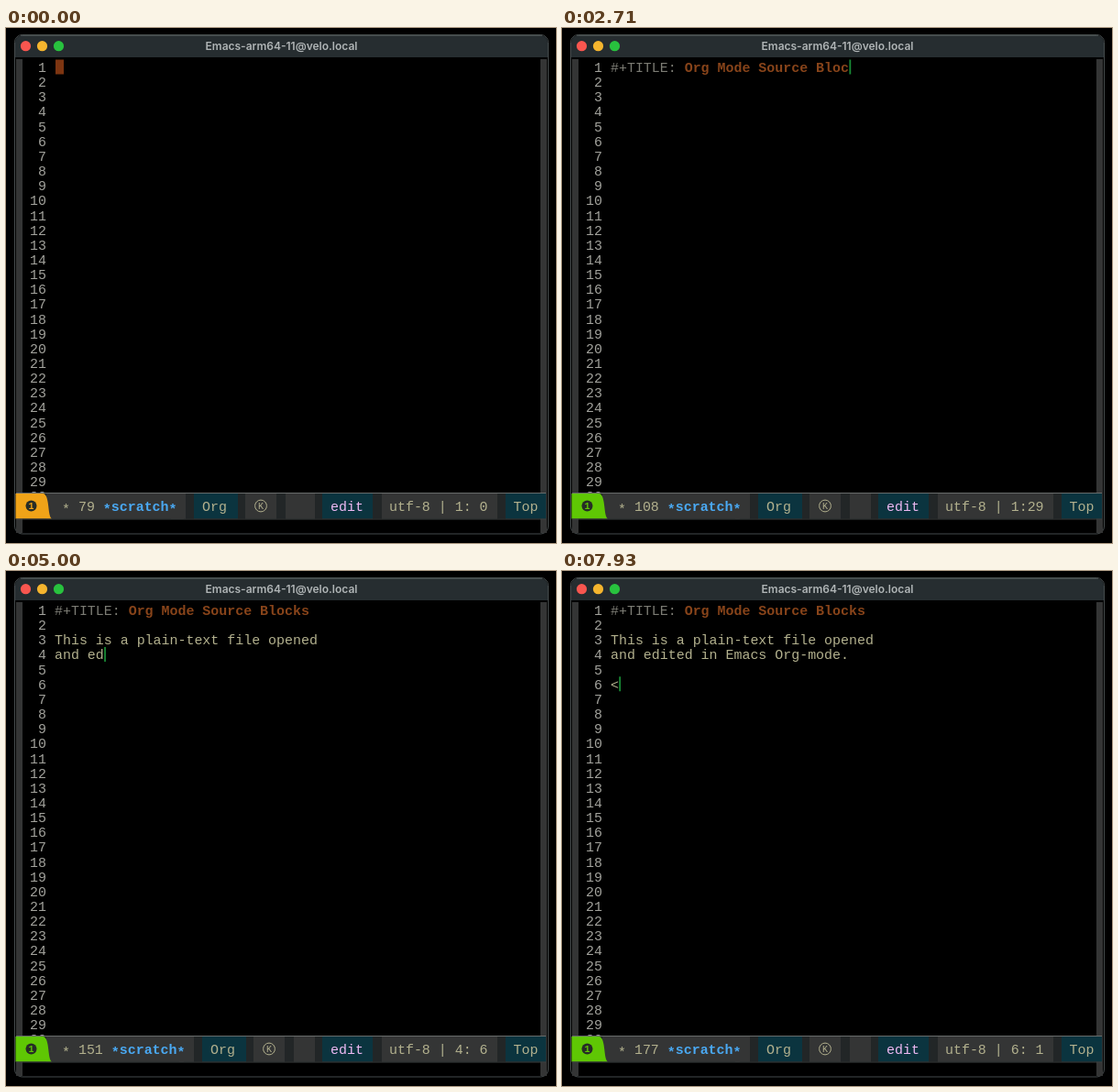
Write an HTML page that moves like this. It is 600 by 562 pixels and loops after 8 s.

```html
<!DOCTYPE html>
<html lang="en">
<head>
<meta charset="utf-8">
<style>
  html, body { margin: 0; height: 100%; overflow: hidden; background: #000; }
  svg { display: block; width: 100vw; height: 100vh; }
  text { font: 14.95px "Liberation Mono", monospace; white-space: pre; fill: #b3b18e; }
  .title { font: 600 12px Inter, sans-serif; fill: #b0b5b6; text-anchor: middle; }
  .num { fill: #a2a29c; text-anchor: end; }
  .key { fill: #7c7c74; }
  .head { fill: #88441a; font-weight: bold; }
  .name { fill: #4aa9f3; font-weight: bold; }
  .mode { fill: #efbaf5; }
  .mid { text-anchor: middle; }
  .gray { fill: #343535; }
  .teal { fill: #0b343f; }
</style>
</head>
<body>
<svg viewBox="0 0 600 562">
  <rect x="9.5" y="7.5" width="582" height="544.5" rx="8" stroke="#454b4c"/>
  <path d="M10 32V16a8 8 0 0 1 8-8H583a8 8 0 0 1 8 8V32Z" fill="#262d30"/>
  <path d="M16 8H585" stroke="#596061"/>
  <circle cx="21.5" cy="19.7" r="5.6" fill="#f9564f"/>
  <circle cx="39.5" cy="19.7" r="5.6" fill="#f5b52e"/>
  <circle cx="57.5" cy="19.7" r="5.6" fill="#28c23e"/>
  <text class="title" x="300.5" y="23.8">Emacs-arm64-11@velo.local</text>
  <path class="gray" d="M11 34h7V551h-7ZM583 34h7V551h-7Z"/>

  <g id="lines"></g>
  <rect id="cursor"/>

  <rect x="11" y="508" width="578" height="27.5" fill="#222627"/>
  <rect class="gray" x="44" y="508" width="150" height="27.5"/>
  <g id="left">
    <rect class="gray" x="180" y="508" width="16" height="27.5"/>
    <rect class="teal" x="205" y="508" width="48" height="27.5"/>
    <rect class="gray" x="261" y="508" width="34" height="27.5"/>
    <text x="214" y="527">Org</text>
    <circle cx="278" cy="521.5" r="6.4" fill="none" stroke="#b3b18e"/>
    <text class="mid" x="278" y="525" style="font-size:10px">K</text>
  </g>
  <rect id="gap" class="gray" y="508" height="27.5"/>
  <rect class="teal" x="345" y="508" width="55" height="27.5"/>
  <rect class="gray" x="410" y="508" width="126" height="27.5"/>
  <rect class="teal" x="545" y="508" width="44" height="27.5"/>
  <path id="badge" d="M10.5 508H41C48 511 45 532 50 535.5H10.5Z"/>
  <circle cx="27.5" cy="521.5" r="6" fill="#262c26"/>
  <text id="digit" class="mid" x="27.5" y="525" style="font-size:10px;font-weight:bold">1</text>
  <text x="61" y="527"><tspan dy="3">*</tspan><tspan id="size" dy="-3"></tspan><tspan class="name"><tspan dy="3">*</tspan><tspan dy="-3">scratch</tspan><tspan dy="3">*</tspan></tspan></text>
  <text class="mode" x="354" y="527">edit</text>
  <text id="pos" x="418" y="527"></text>
  <text x="553.5" y="527">Top</text>
  <path d="M11 507.5H589" stroke="#686b6a"/>
  <path d="M11 536H589" stroke="#3d4040"/>
</svg>
<script>
const LOOP = 8000, INSERT_AT = 1000, START_SIZE = 79;
const X = 53, CHAR = 8.97, LINE = 16.15;
const script = `#+TITLE: Org Mode Source Blocks

This is a plain-text file opened
and edited in Emacs Org-mode.

<`;
// [time, characters typed]
const keys = [[0, 0], [1500, 0], [2760, 31], [3630, 31], [4300, 47.5], [5640, 95], [7500, 95], [7900, 98], [LOOP, 98]];

const $ = id => document.getElementById(id);
const set = (el, attrs) => { for (const k in attrs) el.setAttribute(k, attrs[k]); };

function add(tag, parent, attrs) {
  const el = document.createElementNS('http://www.w3.org/2000/svg', tag);
  set(el, attrs);
  return parent.appendChild(el);
}

const rows = [];
for (let i = 0; i < 30; i++) {
  const y = 48 + i * LINE;
  add('text', $('lines'), { x: 44, y, class: 'num' }).textContent = i + 1;
  if (i < 6) rows.push(add('text', $('lines'), { x: X, y }));
}
const [keyword, heading] = ['key', 'head'].map(c => add('tspan', rows[0], { class: c }));

function typedAt(t) {
  const i = keys.findIndex(k => k[0] > t);
  const [t0, n0] = keys[i - 1], [t1, n1] = keys[i];
  return Math.floor(n0 + (n1 - n0) * (t - t0) / (t1 - t0));
}

function draw(now) {
  const t = now % LOOP;
  const n = typedAt(t), size = START_SIZE + n;
  const lines = script.slice(0, n).split('\n');
  const row = lines.length - 1, col = lines[row].length;
  const inserting = t >= INSERT_AT;

  keyword.textContent = lines[0].slice(0, 9);
  heading.textContent = lines[0].slice(9);
  for (let i = 1; i < rows.length; i++) rows[i].textContent = lines[i] || '';

  set($('cursor'), {
    x: X + col * CHAR + (inserting ? 0.3 : 1),
    y: 34.5 + row * LINE,
    width: inserting ? 1.8 : 9,
    height: 16,
    fill: inserting ? '#188a35' : '#7d3511'
  });

  const color = inserting ? '#5fc704' : '#f0a318';
  $('badge').style.fill = $('digit').style.fill = color;
  const shift = size > 99 ? 9 : 0;
  set($('left'), { transform: `translate(${shift})` });
  set($('gap'), { x: 305 + shift, width: 32 - shift });
  $('size').textContent = ` ${size} `;
  $('pos').textContent = `utf-8 | ${row + 1}:${String(col).padStart(2)}`;
}

function tick(now) {
  draw(now);
  requestAnimationFrame(tick);
}
draw(0);
requestAnimationFrame(tick);
</script>
</body>
</html>
```
